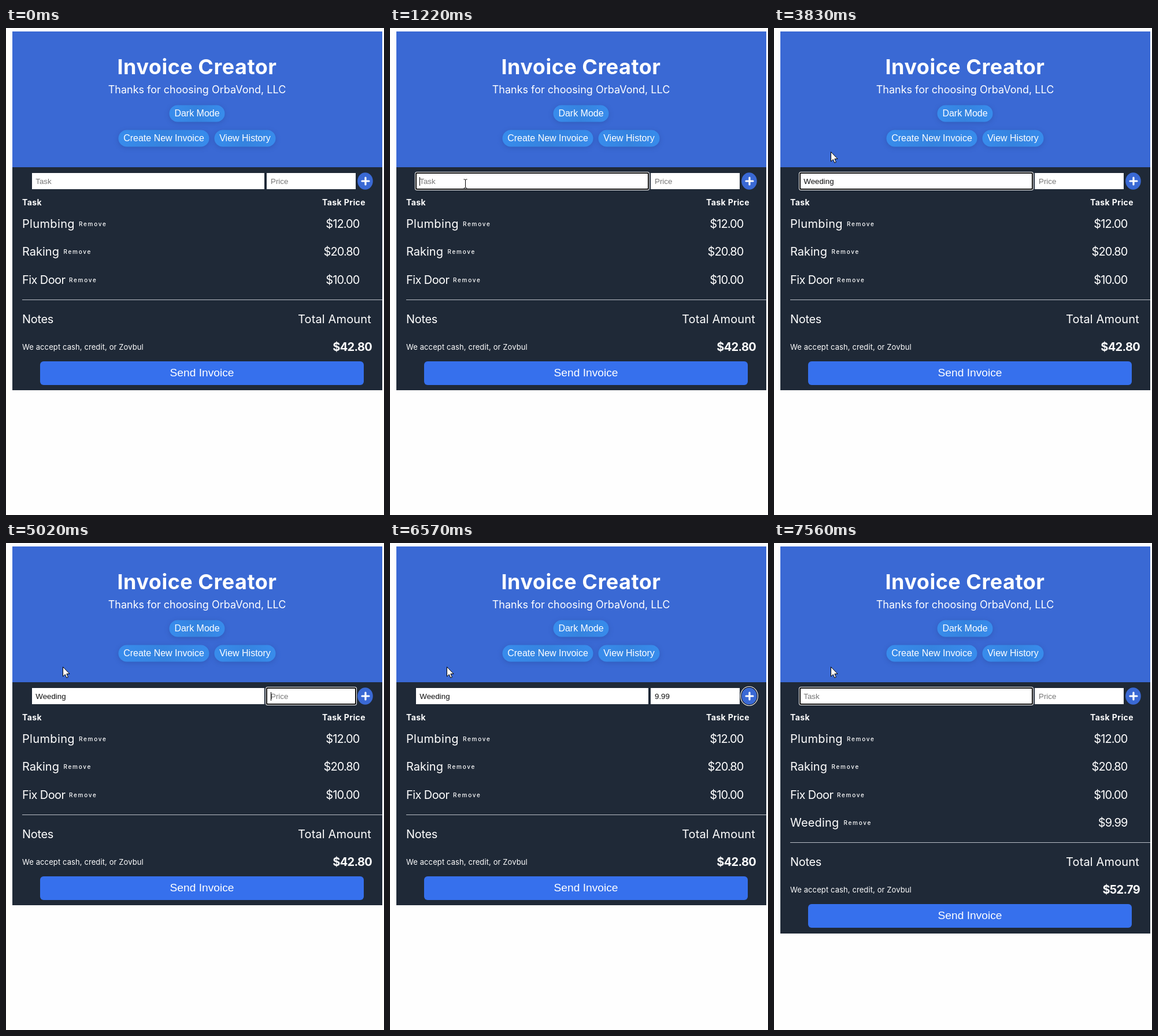
Animation of 654x843 px, one loop 8000 ms. Source, as an HTML page:

```html
<!DOCTYPE html>
<html lang="en">
<head>
<meta charset="utf-8">
<title>Invoice Creator</title>
<style>
  html, body { margin: 0; width: 100%; height: 100%; overflow: hidden; background: #fefefe; }
  svg { display: block; font-family: Inter, "Open Sans", sans-serif; fill: #fff; }
  text { white-space: pre; }
  .ui { font-family: "Liberation Sans", Arial, sans-serif; }
  .title { font-size: 36px; font-weight: 700; letter-spacing: .5px; }
  .sub { font-size: 18px; }
  .btn { font-size: 16px; }
  .send { font-size: 19.2px; }
  .head { font-size: 14px; font-weight: 700; letter-spacing: .4px; }
  .row { font-size: 20px; }
  .remove { font-size: 10px; font-weight: 500; letter-spacing: 1.7px; }
  .price { font-size: 20px; letter-spacing: -.9px; }
  .note { font-size: 13px; letter-spacing: .1px; }
  .total { font-size: 20px; font-weight: 700; letter-spacing: -.7px; }
  .field { font-size: 13.333px; }
  .mid { text-anchor: middle; }
  .end { text-anchor: end; }
  .pill { fill: url(#pill); filter: drop-shadow(0 2px 4px rgba(20, 40, 100, .22)); }
</style>
</head>
<body>
<svg id="stage" width="654" height="843" viewBox="0 0 654 843">
  <defs>
    <linearGradient id="pill">
      <stop offset="0" stop-color="#388cec"/>
      <stop offset=".5" stop-color="#3583df"/>
      <stop offset="1" stop-color="#388cec"/>
    </linearGradient>
  </defs>

  <rect id="panel" x="11" y="241" width="640" height="386" fill="#1f2937"/>
  <rect x="11" y="6" width="640" height="235" fill="#3a69d4"/>
  <text class="title mid" x="330.5" y="80">Invoice Creator</text>
  <text class="sub mid" x="330.5" y="113">Thanks for choosing OrbaVond, LLC</text>
  <g id="pills"></g>

  <g id="fields"></g>
  <g id="plus">
    <ellipse class="ring" cx="621.5" cy="265" rx="15.5" ry="17"/>
    <ellipse class="ring" cx="621.5" cy="265" rx="14.4" ry="15.9" fill="#101010"/>
    <ellipse cx="621.5" cy="265" rx="13.3" ry="14.8" fill="#3a69d4"/>
    <path d="M616 265h12M622 259v12" stroke="#fff" stroke-width="3.2" stroke-linecap="round"/>
  </g>
  <rect id="caret" y="258" width="1" height="15" fill="#000"/>

  <text class="head" x="28" y="307">Task</text>
  <text class="head end" x="622" y="307">Task Price</text>
  <g id="rows"></g>

  <g id="footer">
    <rect x="28" y="470" width="623" height="1" fill="#b9bec6"/>
    <text class="row" x="28" y="511" letter-spacing="-.3">Notes</text>
    <text class="row end" x="632" y="511" letter-spacing=".15">Total Amount</text>
    <text class="note" x="28" y="557">We accept cash, credit, or Zovbul</text>
    <text id="total" class="total end" x="633" y="559"></text>
    <rect x="59" y="577" width="560" height="41" rx="6" fill="#3670ed"/>
    <text class="ui send mid" x="339" y="603">Send Invoice</text>
  </g>

  <g id="cursor">
    <path id="arrow" d="M0 0V16.5L3.8 13L6.3 18.8L8.9 17.7L6.4 12H11.5Z" stroke="#000"/>
    <path id="beam" d="M-3 -7.5H-1L0 -6.5L1 -7.5H3M0 -6.5V6.5M-3 7.5H-1L0 6.5L1 7.5H3" fill="none" stroke="#000"/>
  </g>
</svg>

<script>
const LOOP = 8000;
const ADDED = 7040;
const ROW_H = 48.4;
const $ = id => document.getElementById(id);

// [time, focus, task, price]
const states = [
  [0, '', '', ''],
  [1150, 'task', '', ''],
  [2440, 'task', 'W', ''],
  [2640, 'task', 'We', ''],
  [2840, 'task', 'Wee', ''],
  [2970, 'task', 'Weed', ''],
  [3170, 'task', 'Weedi', ''],
  [3235, 'task', 'Weedin', ''],
  [3300, 'task', 'Weeding', ''],
  [3960, 'price', 'Weeding', ''],
  [5090, 'price', 'Weeding', '9'],
  [5710, 'price', 'Weeding', '9.'],
  [5970, 'price', 'Weeding', '9.9'],
  [6090, 'price', 'Weeding', '9.99'],
  [6570, 'plus', 'Weeding', '9.99'],
  [ADDED, 'task', '', '']
];
const caretOff = [[1710, 2240], [3830, 3960], [4490, 5020], [5640, 5710], [7560, LOOP]];

// [time, x, y] of the pointer
const path = [
  [120, 610, 815], [327, 530, 615], [396, 475, 522], [465, 435, 475],
  [672, 255, 360], [741, 185, 310], [879, 130, 269],
  [1350, 130, 269], [1560, 98.5, 214.5]
];
const TICK = 69;

function add(parent, tag, attrs, content = '') {
  const el = document.createElementNS('http://www.w3.org/2000/svg', tag);
  for (const k in attrs) el.setAttribute(k, attrs[k]);
  el.textContent = content;
  return parent.appendChild(el);
}

const show = (el, on) => el.setAttribute('visibility', on ? 'visible' : 'hidden');

function pill(x, y, w, label) {
  add($('pills'), 'rect', { class: 'pill', x, y, width: w, height: 29, rx: 14.5 });
  add($('pills'), 'text', { class: 'ui btn mid', x: x + w / 2, y: y + 19.5 }, label);
}
pill(282.5, 133.5, 96, 'Dark Mode');
pill(194.5, 176.5, 157, 'Create New Invoice');
pill(360.5, 176.5, 106, 'View History');

function field(x, w, textX, hint) {
  const g = $('fields');
  const box = (d, rx, fill) =>
    add(g, 'rect', { x: x - d, y: 251 - d, width: w + 2 * d, height: 28 + 2 * d, rx, fill });
  box(0, 0, '#fff');
  const ring = [box(2, 3.5, '#fff'), box(1, 2.5, '#101010'), box(-1, 1, '#fff')];
  const label = add(g, 'text', { class: 'ui field', x: textX, y: 270 });
  return { textX, hint, ring, label };
}
const fields = {
  task: field(45, 402, 51.3, 'Task'),
  price: field(451, 154, 458, 'Price')
};

// [name, remove x, price, name spacing]
const rows = [
  ['Plumbing', 126, '$12.00', .35],
  ['Raking', 99.5, '$20.80', 0],
  ['Fix Door', 109, '$10.00', -.6],
  ['Weeding', 120.5, '$9.99', .2]
].map(([name, removeX, price, gap], i) => {
  const y = Math.round(346 + i * ROW_H);
  const g = add($('rows'), 'g', {});
  add(g, 'text', { class: 'row', x: 28, y, 'letter-spacing': gap }, name);
  add(g, 'text', { class: 'remove', x: removeX, y: y - 3 }, 'Remove');
  add(g, 'text', { class: 'price end', x: 611.5, y }, price);
  return g;
});

const plusRings = document.querySelectorAll('.ring');

function pointAt(t) {
  const i = path.findIndex(p => p[0] > t);
  if (i < 0) return path[path.length - 1].slice(1);
  const [a, b] = [path[i - 1], path[i]];
  const u = (t - a[0]) / (b[0] - a[0]);
  return [a[1] + (b[1] - a[1]) * u, a[2] + (b[2] - a[2]) * u];
}

function drawCursor(t) {
  show($('cursor'), t >= 120);
  if (t < 120) return;
  const start = t < 1420 ? 120 : 1420;
  const tick = t < 1420 ? TICK : 70;
  const [x, y] = pointAt(start + Math.floor((t - start) / tick) * tick);
  const inField = y > 251 && y < 279;
  $('arrow').style.display = inField ? 'none' : '';
  $('beam').style.display = inField ? '' : 'none';
  $('cursor').setAttribute('transform', `translate(${Math.floor(x) + .5} ${Math.floor(y) + .5})`);
}

function drawForm(t) {
  const [, focus, task, price] = states.filter(s => s[0] <= t).pop();
  const values = { task, price };
  for (const key in fields) {
    const f = fields[key];
    f.label.textContent = values[key] || f.hint;
    f.label.setAttribute('fill', values[key] ? '#111' : '#757575');
    f.ring.forEach(r => show(r, focus === key));
  }
  plusRings.forEach(r => show(r, focus === 'plus'));

  const active = fields[focus];
  const lit = active && !caretOff.some(([a, b]) => t >= a && t < b);
  show($('caret'), lit);
  if (lit) {
    const w = values[focus] ? active.label.getComputedTextLength() : 0;
    $('caret').setAttribute('x', Math.floor(active.textX + w));
  }
}

function drawList(t) {
  const added = t >= ADDED;
  show(rows[3], added);
  $('panel').setAttribute('height', added ? 435 : 386);
  $('footer').setAttribute('transform', `translate(0 ${added ? 48 : 0})`);
  $('total').textContent = added ? '$52.79' : '$42.80';
}

const begin = performance.now();
function frame() {
  const t = (performance.now() - begin) % LOOP;
  drawCursor(t);
  drawForm(t);
  drawList(t);
  requestAnimationFrame(frame);
}
frame();
</script>
</body>
</html>
```
